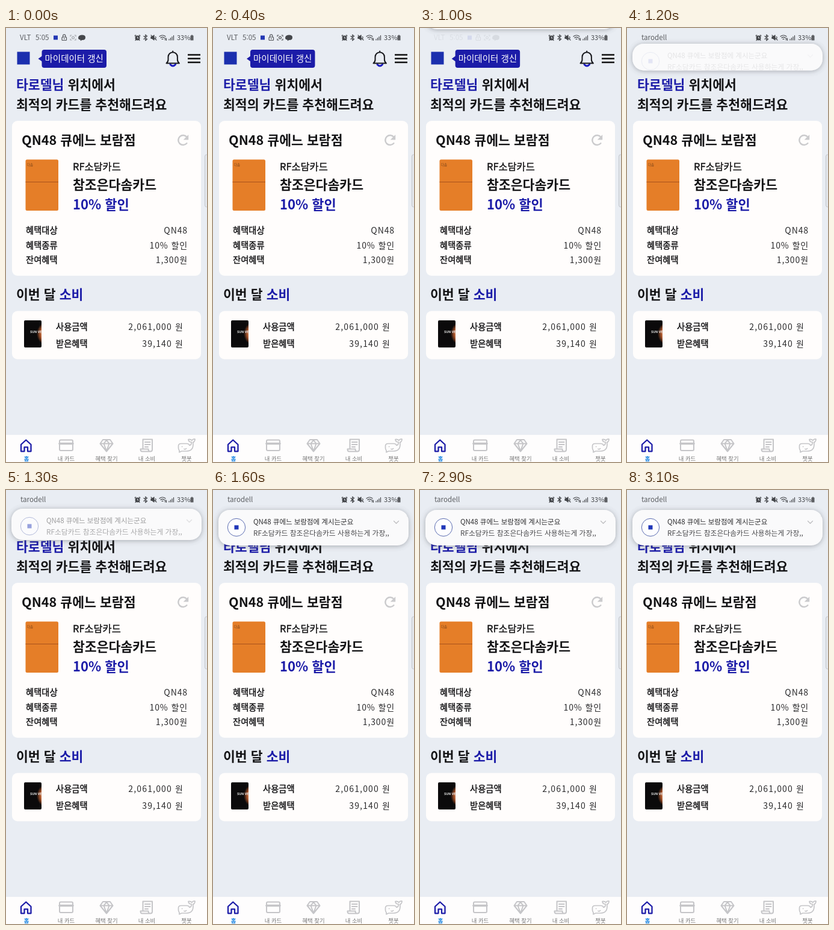
An HTML page for the animation above (4 s loop, 334 by 720 pixels).

```html
<!DOCTYPE html>
<html lang="ko">
<head>
<meta charset="utf-8">
<style>
html, body { margin: 0; width: 100%; height: 100%; overflow: hidden; background: #e9edf3; }
svg { display: block; width: 334px; height: 720px; font-family: "Noto Sans CJK KR", "Noto Sans CJK", "Noto Sans", sans-serif; }
text { fill: #141416; }
.h { font-weight: 700; font-size: 21.6px; }
.m { font-weight: 500; font-size: 14.3px; stroke: #141416; stroke-width: .4px; }
.v { font-size: 14px; letter-spacing: .9px; text-anchor: end; fill: #2a2a2c; }
.tab { font-size: 9.4px; text-anchor: middle; fill: #777; }
.st { font-size: 11.6px; fill: #5b5d61; }
.note { font-size: 11.8px; fill: #2e2e30; }
.b { fill: #1c1ca8; }
.line { fill: none; stroke-linecap: round; stroke-linejoin: round; }
</style>
</head>
<body>
<svg viewBox="0 0 334 720">
  <defs>
    <radialGradient id="glow" gradientUnits="userSpaceOnUse" cx="72" cy="507" r="21">
      <stop offset=".55" stop-color="#d98a5a"/>
      <stop offset=".74" stop-color="#a4532c"/>
      <stop offset="1" stop-color="#0b0a0b"/>
    </radialGradient>
    <filter id="shade" x="-10%" y="-60%" width="120%" height="220%">
      <feDropShadow dx="0" dy="1" stdDeviation="4" flood-color="#50545c" flood-opacity=".45"/>
    </filter>
    <clipPath id="clip"><rect id="clipBox" x="9" width="316" rx="19"/></clipPath>
  </defs>

  <rect width="334" height="720" fill="#e9edf3"/>

  <!-- status bar -->
  <g id="status">
    <text class="st" x="23" y="20">VLT</text>
    <text class="st" x="49" y="20">5:05</text>
    <rect x="79" y="12.5" width="7" height="7" fill="#2438b4"/>
    <g class="line" stroke="#55575b" stroke-width="1.2">
      <rect x="93" y="15" width="7.5" height="5.5" rx="1"/>
      <path d="M94.6 15v-2a2.1 2.1 0 0 1 4.2 0v2M96.8 17v1.4"/>
      <g id="scan"><path d="M107 14v-2h2M114 12h2v2M116 18v2h-2M109 20h-2v-2"/><circle cx="111.5" cy="16" r="1.9"/></g>
    </g>
    <path d="M120 16.5q0-4.5 6-5 6 0 6 4 0 5-6 4.5l-2 1.5-.5-2q-3.5-.5-3.5-3z" fill="#45474b"/>
  </g>
  <text class="st" id="app" x="24" y="20">tarodell</text>
  <g class="line" stroke="#44464a" stroke-width="1.2">
    <circle cx="218.5" cy="16.5" r="3.4" fill="#44464a"/>
    <path d="M218.500 14.8v2h1.5" stroke="#e9edf3" stroke-width=".9"/>
    <path d="M214.5 13.5v-1.500h1.500M222.500 13.500v-1.500h-1.500M215 20.500l1-1M222 20.500l-1-1"/>
    <path d="M229 13.5l5.500 5-2.800 2.300v-9.600l2.800 2.300-5.500 5"/>
    <path d="M241 14.500h2l3-2.500v8l-3-2.500h-2z" fill="#44464a"/>
    <path d="M248.500 14.500q1.300 1.500 0 3.500M241 12l9 8"/>
    <path d="M255 14q5-4 10 0M257 16.300q3-2.400 6 0M259 18.500q1-.8 2 0M264.500 20v-3.500M266.500 17v3.500"/>
    <path d="M271 20v-1.500M273.500 20v-3.500M276 20v-5.500M278.500 20v-7.500"/>
  </g>
  <text class="st" x="284" y="20" style="font-size:11px;fill:#44464a">33%</text>
  <path d="M306.500 12.500h1.500v-1h2v1h1.500v8h-5z" fill="#5b5d61"/>

  <!-- header -->
  <rect x="18.5" y="39.5" width="21" height="21" fill="#1b2fae"/>
  <g id="badge">
    <path d="M53.5 51l7-5v10z" fill="#1c1ca8"/>
    <rect x="59.5" y="36" width="107.5" height="30" rx="4" fill="#1c1ca8"/>
    <text x="64.5" y="56.2" font-size="14.5" style="fill:#fff">마이데이터 갱신</text>
  </g>
  <path d="M273 60.5q4.3 5 8.600 0" class="line" stroke="#1c1cc0" stroke-width="3"/>
  <path d="M266.500 58.500q3-2.500 3-6v-4.500a7.700 7.700 0 0 1 15.400 0v4.500q0 3.500 3 6zM277.200 40v-1.500" class="line" stroke="#17181c" stroke-width="2"/>
  <path d="M302 44.500h21M302 50.700h21M302 57h21" stroke="#111" stroke-width="2.4"/>

  <text class="h" x="17" y="101.5"><tspan class="b">타로델님</tspan> 위치에서</text>
  <text class="h" x="17" y="134.7">최적의 카드를 추천해드려요</text>

  <!-- recommendation -->
  <rect x="10" y="154" width="314" height="257" rx="9" fill="#fffdfc"/>
  <text class="h" x="26" y="194">QN48 큐에느 보람점</text>
  <path d="M300.300 191.300a8 8 0 1 1 .2-10.300" class="line" stroke="#cbcbcd" stroke-width="2.5"/>
  <path d="M303.200 177v8.500h-8.500z" fill="#cbcbcd"/>
  <rect x="32.5" y="218.300" width="54.500" height="84.700" rx="2.5" fill="#e57e28"/>
  <path d="M32.500 255.500h54.500" stroke="#a8521c"/>
  <text x="34.5" y="228.5" font-size="5.8" style="fill:#7d4519">다솜</text>
  <text class="m" x="111" y="236" style="font-size:16.4px">RF소담카드</text>
  <text class="h" x="111" y="268">참조은다솜카드</text>
  <text class="h b" x="111" y="300.7" style="font-size:22px">10% 할인</text>
  <text class="m" x="33" y="341">혜택대상</text><text class="v" x="302" y="341">QN48</text>
  <text class="m" x="33" y="365.5">혜택종류</text><text class="v" x="302" y="365.5">10% 할인</text>
  <text class="m" x="33" y="390">잔여혜택</text><text class="v" x="302" y="390">1,300원</text>

  <!-- spending -->
  <text class="h" x="17" y="450">이번 달 <tspan class="b">소비</tspan></text>
  <rect x="10" y="469.5" width="314" height="80" rx="9" fill="#fffdfc"/>
  <rect x="30" y="485" width="29" height="45" rx="2" fill="url(#glow)"/>
  <text x="40" y="506" font-size="5.3" font-weight="700" style="fill:#eee">SUN VE</text>
  <text class="m" x="83" y="500.7">사용금액</text><text class="v" x="295" y="500.7" style="letter-spacing:1.15px">2,061,000 원</text>
  <text class="m" x="83" y="529">받은혜택</text><text class="v" x="295" y="529" style="letter-spacing:1.15px">39,140 원</text>
  <rect x="330.5" y="210" width="8" height="87" rx="3" fill="#e4e7ec" stroke="#c3c7cd"/>

  <!-- tab bar -->
  <rect y="675" width="334" height="45" fill="#fefdfd"/>
  <g class="line" stroke="#c5c5c8" stroke-width="2">
    <path d="M25 691v11.300h5.500v-7h5.500v7h5.500v-11.300l-8.250-7.500z" stroke="#1c1ca8" stroke-width="2.3"/>
    <rect x="89" y="683.5" width="22" height="17.500" rx="2"/><path d="M89 689.500h22" stroke-width="3.600"/>
    <path d="M161 683h12l4.500 6.500-10.500 13-10.500-13zM156.500 689.500h21M167 702l-4.500-12.500 4.500-6 4.500 6z"/>
    <path d="M227.500 698v-15.500h15.500v17q0 3-3 3h-14q-2.500 0-2.500-4h13q0 4 3 4M231 687h8.500M231 691h8.500M231 695h5"/>
    <path d="M291 689.500h9.500q3.500 0 4.500 3 3.500-1 3.300-5.500-5 0-5.300-4.500 4-.5 5.800 1.800 1.700-2.800 5.200-2.300 0 4.500-3.300 5.300 1.800 14.700-10.700 14.700h-8l-4 1.800v-3q-1.500-1.300-1.500-4v-3.300q0-4 4.500-4zM292.500 694.500h.3M296 698.500q2 1 3.500-.8" stroke-width="1.700"/>
  </g>
  <text class="tab" x="34" y="717.5" style="fill:#1683e2;font-weight:700">홈</text>
  <text class="tab" x="100" y="717.5">내 카드</text>
  <text class="tab" x="167" y="717.5">혜택 찾기</text>
  <text class="tab" x="234" y="717.5">내 소비</text>
  <text class="tab" x="300" y="717.5">챗봇</text>

  <!-- notification -->
  <g id="panel">
    <rect id="sheet" x="9" width="316" rx="19" fill="#fafafb" filter="url(#shade)"/>
    <g clip-path="url(#clip)">
      <g id="body">
        <circle cx="39" cy="62" r="14.7" fill="#fdfdff" stroke="#5a6bb0"/>
        <rect x="35.5" y="58.5" width="7" height="7" fill="#1f36b8"/>
        <text class="note" x="67" y="56.5" style="font-size:11.5px">QN48 큐에느 보람점에 계시는군요</text>
        <text class="note" x="67" y="75.5" style="fill:#48484b">RF소담카드 참조은다솜카드 사용하는게 가장,,</text>
        <path d="M300.5 51.500l4 4 4-4" class="line" stroke="#bdbdc0" stroke-width="1.3"/>
      </g>
    </g>
  </g>
</svg>
<script>
const LOOP = 4000, STEP = 100;
const el = id => document.getElementById(id);
const set = (id, attrs) => { for (const k in attrs) el(id).setAttribute(k, attrs[k]); };

// Piecewise linear value through [time, value] pairs
function track(t, keys) {
  if (t <= keys[0][0]) return keys[0][1];
  for (let i = 1; i < keys.length; i++) {
    const [a, u] = keys[i - 1], [b, v] = keys[i];
    if (t <= b) return u + (v - u) * (t - a) / (b - a);
  }
  return keys[keys.length - 1][1];
}

function draw(t) {
  const sway = 2.5 * Math.sin(2 * Math.PI * t / 1800);
  set('badge', { transform: `translate(${sway.toFixed(2)} 0)` });
  set('scan', { opacity: track(t, [[0, .45], [100, 1]]) });
  set('status', { opacity: track(t, [[700, 1], [900, .4], [1000, .1], [1100, 0]]) });
  set('app', { opacity: track(t, [[1000, 0], [1100, .5], [1200, 1]]) });

  const top = track(t, [[900, -60], [1000, -43], [1100, -5], [1200, 26], [1300, 31], [1400, 33]]);
  const bottom = track(t, [[900, -15], [1000, 2], [1100, 40], [1200, 70.5], [1300, 83], [1400, 89], [1500, 92]]);
  const box = { y: top, height: bottom - top };
  set('panel', { visibility: t < 1000 ? 'hidden' : 'visible' });
  set('sheet', box);
  set('clipBox', box);
  set('body', {
    transform: `translate(0 ${top - 33})`,
    opacity: track(t, [[1100, 0], [1200, .1], [1300, .45], [1400, .8], [1500, 1]])
  });
}

function tick() {
  const t = performance.now() % LOOP;
  draw(Math.floor(t / STEP) * STEP);
  requestAnimationFrame(tick);
}
tick();
</script>
</body>
</html>
```
